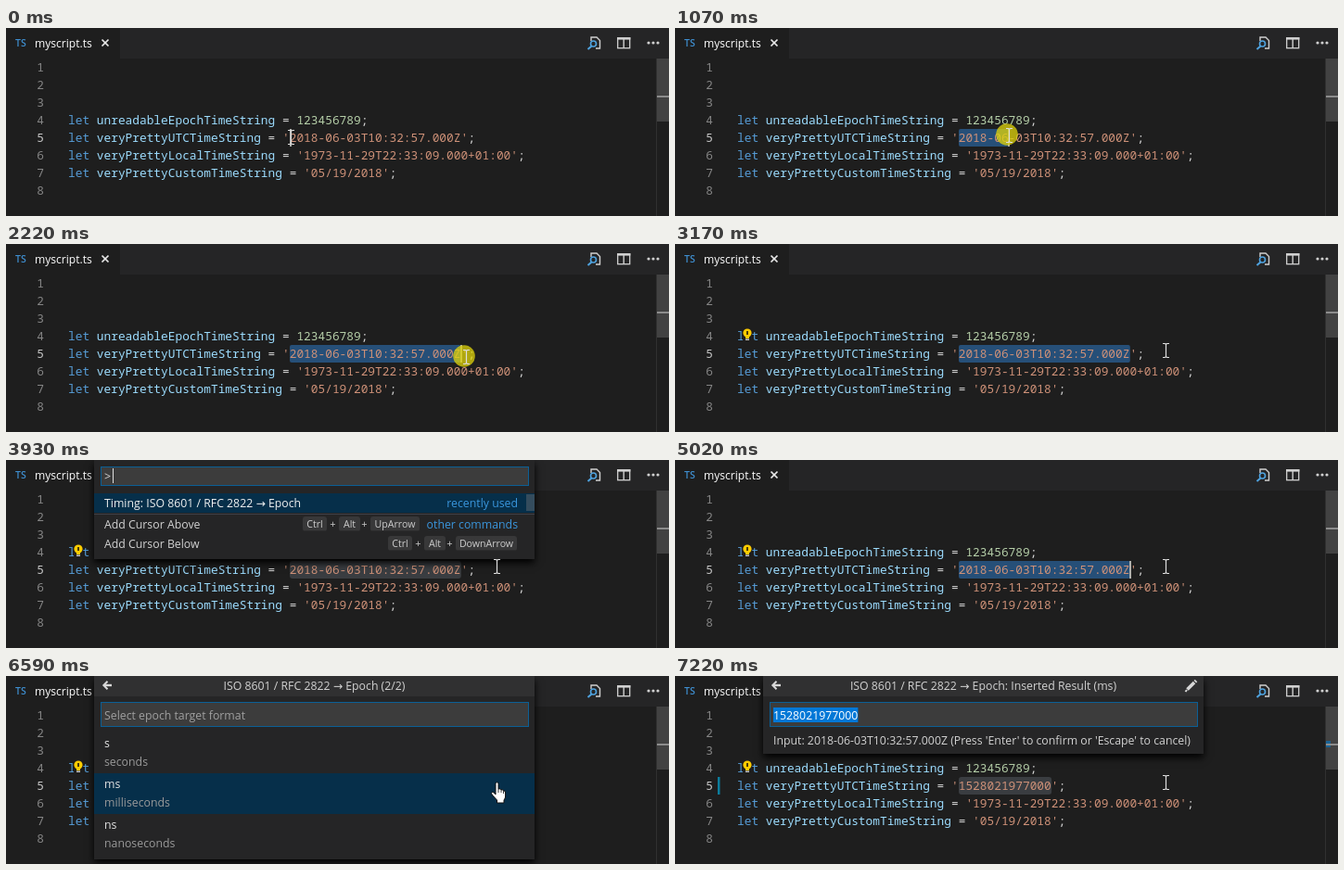
An HTML page with a canvas for the animation above (8 s loop, 715x203 px).

```html
<!DOCTYPE html>
<html lang="en">
<head>
<meta charset="utf-8">
<title>Epoch conversion in an editor</title>
<style>
html, body { margin: 0; width: 100%; height: 100%; overflow: hidden; background: #1e1e1e; }
canvas { display: block; width: 715px; height: 203px; }
</style>
</head>
<body>
<canvas id="stage" width="715" height="203"></canvas>
<script>
const ctx = document.getElementById('stage').getContext('2d');
const LOOP = 8000;
const CODE = '12.83px "Noto Sans Mono", "DejaVu Sans Mono", monospace';
const ui = (size = 12.3, weight = 400) => `${weight} ${size}px "Open Sans", "Noto Sans", "DejaVu Sans", sans-serif`;
const CHAR = 7.7, LEFT = 67, LINE = 19, START = 306;
const DATE = '2018-06-03T10:32:57.000Z', RESULT = '1528021977000';
const C = {
  bg: '#1e1e1e', panel: '#252526', input: '#3c3c3c', row: '#062f4a', title: '#303031',
  key: '#569cd6', name: '#9cdcfe', op: '#d4d4d4', num: '#b5cea8', str: '#ce9178',
  sel: '#264f78', dimSel: '#3a3d41', link: '#3a96dd', text: '#d2d2d2', dim: '#9a9a9a'
};

function rect(x, y, w, h, color) {
  ctx.fillStyle = color;
  ctx.fillRect(x, y, w, h);
}

function round(x, y, w, h, r, color) {
  ctx.fillStyle = color;
  ctx.beginPath();
  ctx.roundRect(x, y, w, h, r);
  ctx.fill();
}

function text(s, x, y, color, font = ui(), align = 'left') {
  ctx.font = font;
  ctx.textAlign = align;
  ctx.fillStyle = color;
  ctx.fillText(s, x, y);
}

function line(points, color, width = 1) {
  ctx.strokeStyle = color;
  ctx.lineWidth = width;
  ctx.beginPath();
  points.forEach(([x, y], i) => i ? ctx.lineTo(x, y) : ctx.moveTo(x, y));
  ctx.stroke();
}

function ring(x, y, r, color, width) {
  ctx.strokeStyle = color;
  ctx.lineWidth = width;
  ctx.beginPath();
  ctx.arc(x, y, r, 0, 7);
  ctx.stroke();
}

// Pointer path: time, x, y
const path = [
  [700, 305, 117], [845, 322, 116], [1070, 358, 115], [1300, 394, 114], [1520, 428, 118],
  [1780, 458, 121], [2000, 481, 126], [2195, 494, 121], [2330, 494, 121], [2690, 527, 114]
];

function pointer(t) {
  const base = t < 2390 ? 770 : 2390;
  const q = t < 770 ? 0 : base + 75 * Math.floor((t - base) / 75);
  if (q <= path[0][0]) return path[0].slice(1);
  for (let i = 1; i < path.length; i++) {
    const [t0, x0, y0] = path[i - 1], [t1, x1, y1] = path[i];
    if (q <= t1) {
      const k = (q - t0) / (t1 - t0);
      return [Math.round(x0 + (x1 - x0) * k), Math.round(y0 + (y1 - y0) * k)];
    }
  }
  return path[path.length - 1].slice(1);
}

function topBar() {
  rect(0, 0, 715, 33, C.panel);
  rect(0, 0, 123, 33, C.bg);
  text('TS', 10, 19.5, '#3f8fd0', ui(10.5, 600));
  text('myscript.ts', 31, 20.5, '#fff', ui(12.1));
  line([[103.5, 12.5], [110.5, 19.5]], '#e8e8e8', 1.7);
  line([[110.5, 12.5], [103.5, 19.5]], '#e8e8e8', 1.7);

  // find in file
  line([[631, 14], [631, 10], [637, 10], [640.5, 13.5], [640.5, 22], [636, 22]], '#d0d0d0', 1.4);
  ring(633.5, 17, 3, '#4fa3df', 1.6);
  line([[631.5, 19.5], [627.5, 23]], '#4fa3df', 2);
  // split editor
  ctx.strokeStyle = '#d0d0d0';
  ctx.lineWidth = 1.3;
  ctx.strokeRect(659.7, 10.7, 13, 11);
  rect(659, 10, 14.4, 2.6, '#d0d0d0');
  rect(665.5, 11, 1.4, 11, '#d0d0d0');
  for (let i = 0; i < 3; i++) {
    ctx.fillStyle = '#d0d0d0';
    ctx.beginPath();
    ctx.arc(693 + i * 5, 16, 1.6, 0, 7);
    ctx.fill();
  }
}

function codeLine(n, name, value, color) {
  let x = LEFT;
  const y = 104 + (n - 4) * LINE;
  const put = (s, c) => { text(s, x, y, c, CODE); x += s.length * CHAR; };
  put('let ', C.key);
  put(name, C.name);
  put(' = ', C.op);
  put(value, color);
  put(';', C.op);
}

function bulb() {
  rect(73, 91, 10, 13, C.bg);
  ctx.fillStyle = '#fc0';
  ctx.beginPath();
  ctx.arc(78, 96, 4.6, 0, 7);
  ctx.fill();
  rect(76, 99, 4, 3, '#fc0');
  rect(77, 94, 2, 4, '#4a3c08');
  rect(76, 102.5, 4, 1.5, '#c8c8c8');
}

function editor(t, p) {
  const done = t >= 7220;
  const count = t < 770 ? 0 : Math.max(0, Math.min(24, Math.round((p[0] - START) / CHAR)));
  const open = (t >= 3930 && t < 5020) || t >= 5100;
  const width = (done ? RESULT.length : count) * CHAR;

  if (width) round(START, 109, width, LINE, open ? 3 : 2, open ? C.dimSel : C.sel);
  if (count === 4) rect(LEFT + 40 * CHAR, 147, 4 * CHAR, LINE, 'rgba(173,214,255,.15)');

  for (let n = 1; n <= 8; n++)
    text(n, 41, 47 + (n - 1) * LINE, n === 5 ? '#c6c6c6' : '#858585', CODE, 'right');
  codeLine(4, 'unreadableEpochTimeString', '123456789', C.num);
  codeLine(5, 'veryPrettyUTCTimeString', `'${done ? RESULT : DATE}'`, C.str);
  codeLine(6, 'veryPrettyLocalTimeString', "'1973-11-29T22:33:09.000+01:00'", C.str);
  codeLine(7, 'veryPrettyCustomTimeString', "'05/19/2018'", C.str);

  const blinkOff = t >= 3170 && t < 3630;
  if (!open && !blinkOff) rect(Math.round(START + width) - (width ? 1 : 0), 109, 2, LINE, '#aeafad');
  if (done) rect(46, 109, 2.5, LINE, '#0c7d9d');
  if (t >= 2540) bulb();

  rect(701, 33, 1, 170, '#303030');
  rect(702, 33, 13, 68, '#424242');
  if (done) rect(702, 70, 5, 7, 'rgba(0,122,204,.6)');
  rect(702, 73, 13, 2, '#8c8c8c');
}

function panel(h) {
  ctx.save();
  ctx.shadowColor = '#000';
  ctx.shadowBlur = 8;
  ctx.shadowOffsetY = 4;
  rect(95, 0, 475, h, C.panel);
  ctx.restore();
}

function field(y, h) {
  rect(102, y, 462, h, C.input);
  ctx.strokeStyle = '#0b5f95';
  ctx.lineWidth = 1;
  ctx.strokeRect(102.5, y + .5, 461, h - 1);
}

function keys(list, y) {
  list.forEach(([label, x, w], i) => {
    round(x, y - 8, w, 16, 3, '#383839');
    rect(x + 1, y + 7, w - 2, 1, '#2c2c2d');
    text(label, x + w / 2, y + 4, '#ccc', ui(10.6), 'center');
    if (i) text('+', x - 6.5, y + 4, '#ccc', ui(11), 'center');
  });
}

function commands(t) {
  panel(107);
  field(7, 21);
  text('>', 106, 22, C.text);
  if (t < 4410 || t >= 4870) rect(115, 9, 1, 16, '#ddd');
  rect(95, 36, 475, 21, C.row);
  rect(95, 58, 475, 1, '#3f3f46');
  text('Timing: ISO 8601 / RFC 2822 → Epoch', 106, 51, '#f0f0f0');
  text('recently used', 552, 51, C.link, ui(), 'right');
  text('Add Cursor Above', 106, 74, C.text);
  text('other commands', 552, 74, C.link, ui(), 'right');
  text('Add Cursor Below', 106, 94.5, C.text);
  keys([['Ctrl', 320, 26], ['Alt', 359, 23], ['UpArrow', 393, 53]], 69);
  keys([['Ctrl', 412, 26], ['Alt', 451, 23], ['DownArrow', 485, 66]], 90);
  // list scrollbar fades out
  const a = t < 4330 ? .4 : t < 4410 ? .2 : 0;
  if (a) rect(561, 37, 9, 18, `rgba(121,121,121,${a})`);
}

function heading(label) {
  rect(95, 0, 475, 22, C.title);
  text(label, 332.5, 14.5, C.text, ui(), 'center');
  line([[114, 10], [106, 10]], '#d8d8d8', 2.4);
  line([[109.5, 5.8], [105.3, 10], [109.5, 14.2]], '#d8d8d8', 2);
}

function formats(t) {
  panel(198);
  heading('ISO 8601 / RFC 2822 → Epoch (2/2)');
  field(28, 27);
  text('Select epoch target format', 106, 46.5, '#a0a0a0');
  const off = (t >= 5560 && t < 6020) || t >= 6590;
  if (!off) rect(106, 33, 1, 17, '#ddd');
  rect(95, t < 6170 ? 61 : 105, 475, 44, C.row);
  [['s', 'seconds'], ['ms', 'milliseconds'], ['ns', 'nanoseconds']].forEach(([unit, full], i) => {
    text(unit, 106, 77 + i * 44, '#e4e4e4');
    text(full, 106, 97 + i * 44, C.dim);
  });
}

function result() {
  panel(84);
  heading('ISO 8601 / RFC 2822 → Epoch: Inserted Result (ms)');
  line([[552.5, 14.5], [560, 7]], '#d8d8d8', 3.6);
  line([[560.8, 6.2], [562, 5]], '#d8d8d8', 3.6);
  line([[550.5, 17], [552, 15]], '#d8d8d8', 2);
  field(28, 27);
  ctx.font = ui();
  rect(106, 34, ctx.measureText(RESULT).width, 16, '#0078d7');
  text(RESULT, 106, 46.5, '#fff');
  text(`Input: ${DATE} (Press 'Enter' to confirm or 'Escape' to cancel)`, 106, 73.5, C.text);
}

function halo([x, y]) {
  ctx.fillStyle = 'rgba(222,210,10,.76)';
  ctx.beginPath();
  ctx.arc(x, y, 11.8, 0, 7);
  ctx.fill();
}

function beam([px, py]) {
  const x = px + 2.5, y = py + 1;
  const color = '#dedede';
  line([[x, y - 6.5], [x, y + 6.5]], color, 1.2);
  for (const s of [-1, 1]) {
    line([[x - 3.5, y + s * 7.5], [x - 1, y + s * 7.5], [x, y + s * 6.5],
          [x + 1, y + s * 7.5], [x + 3.5, y + s * 7.5]], color, 1.1);
  }
}

function hand() {
  ctx.save();
  ctx.translate(523, 114);
  const shape = new Path2D('M5 12V2.5Q5 .8 6.5 .8T8 2.5V8Q10.5 7 11 9Q13 8 13.5 10Q15.6 9.4 15.6 12V16Q15.6 18 14 20V23H6.5V20L1 14Q0 12 1.5 11.4Q3 11 5 14Z');
  ctx.fillStyle = '#fff';
  ctx.strokeStyle = '#111';
  ctx.lineWidth = 1;
  ctx.fill(shape);
  ctx.stroke(shape);
  line([[8, 8], [8, 12]], '#111', .8);
  line([[11, 9], [11, 12]], '#111', .8);
  line([[13.5, 10], [13.5, 13]], '#111', .8);
  ctx.restore();
}

function draw(t) {
  const p = pointer(t);
  rect(0, 0, 715, 203, C.bg);
  topBar();
  editor(t, p);
  if (t >= 7050) result();
  else if (t >= 5100) formats(t);
  else if (t >= 3930 && t < 5020) commands(t);
  if (t >= 460 && t < 2390) halo(p);
  if (t >= 5100 && t < 7050) hand();
  else beam(p);
}

const begin = performance.now();
function tick() {
  draw((performance.now() - begin) % LOOP);
  requestAnimationFrame(tick);
}
tick();
</script>
</body>
</html>
```
